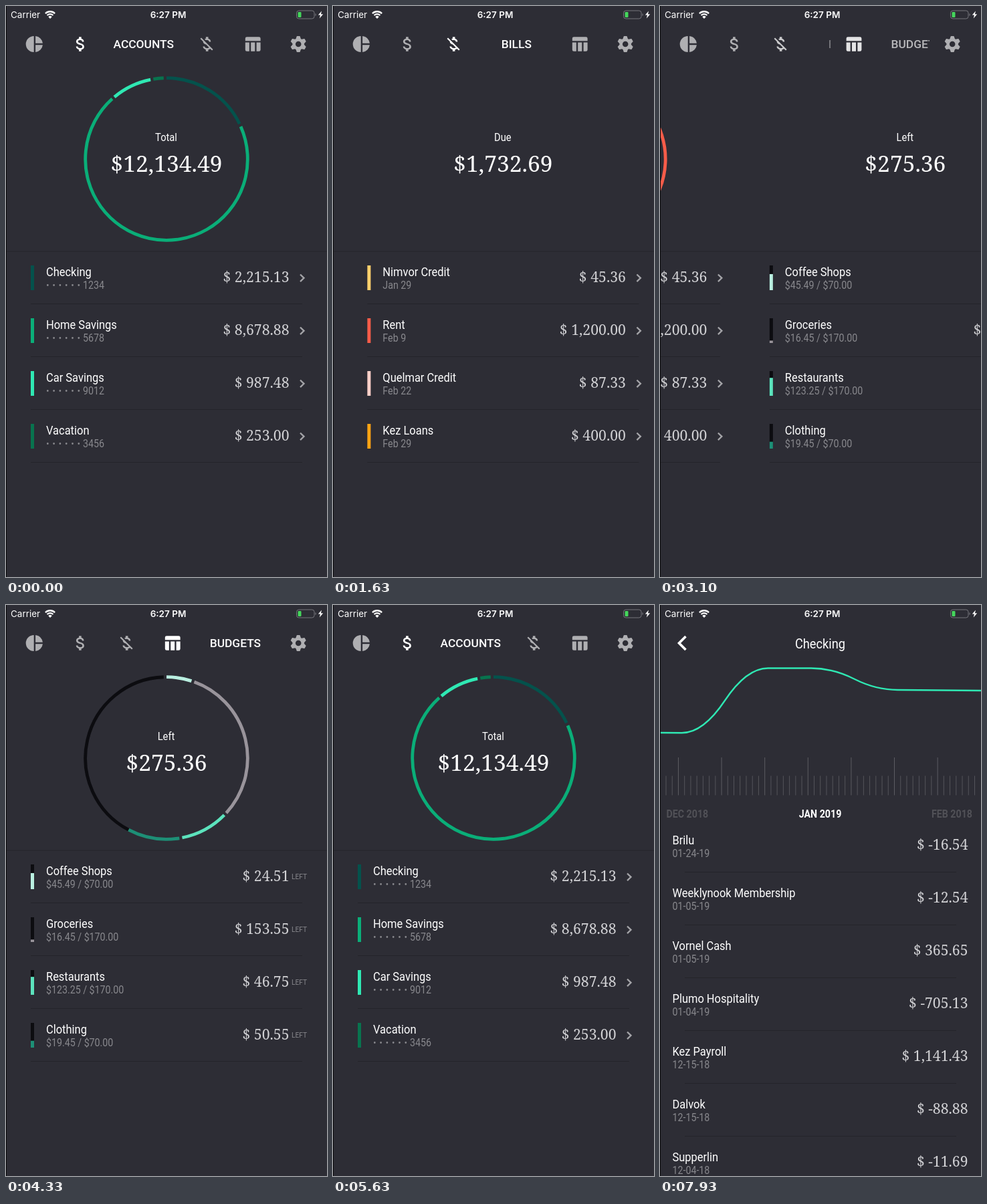
Recreate the animation shown at these times as an HTML page. Size 480x854 px, loop 8 s.

```html
<!DOCTYPE html>
<html lang="en">
<head>
<meta charset="utf-8">
<title>Accounts</title>
<style>
  html, body { margin: 0; width: 100%; height: 100%; overflow: hidden; background: #2d2d35; }
  svg { display: block; width: 100%; height: 100%; }
  text { fill: #fff; white-space: pre; }
  .ui { font-family: Roboto, sans-serif; }
  .num { font-family: "Noto Serif", serif; }
  .sys { font-family: Inter, sans-serif; font-size: 13.5px; }
  .sub { fill: #88888d; }
  .amt { fill: #d2d2d5; }
  .rule { stroke: #24242a; }
</style>
</head>
<body>
<svg id="stage" viewBox="0 0 480 854"></svg>
<script>
const NS = 'http://www.w3.org/2000/svg';
const stage = document.getElementById('stage');
const W = 480, LOOP = 8000, ROW = 79, NARROW = 0.89;
const CELL = 68.57, LABEL = 120;

function el(parent, tag, attrs = {}, text) {
  const node = document.createElementNS(NS, tag);
  for (const k in attrs) node.setAttribute(k, attrs[k]);
  if (text !== undefined) node.textContent = text;
  parent.appendChild(node);
  return node;
}
const group = parent => el(parent, 'g');
const move = (node, x) => node.setAttribute('transform', `translate(${x.toFixed(2)} 0)`);

// Condensed sans text
function label(parent, x, y, size, str, attrs = {}) {
  return el(parent, 'text', { class: 'ui', 'font-size': size,
    transform: `translate(${x} ${y}) scale(${NARROW} 1)`, ...attrs }, str);
}
function money(parent, x, y, str) {
  el(parent, 'text', { class: 'num amt', 'font-size': 21.2, x, y, 'text-anchor': 'end' }, str);
}
function rule(parent, y, x1 = 37, x2 = 443) {
  el(parent, 'line', { class: 'rule', x1, x2, y1: y, y2: y });
}

// ---- easing
const clamp = v => Math.max(0, Math.min(1, v));
const bezier = (x1, y1, x2, y2) => x => {
  x = clamp(x);
  const at = (a, b, u) => 3 * (1 - u) ** 2 * u * a + 3 * (1 - u) * u * u * b + u ** 3;
  let lo = 0, hi = 1;
  for (let i = 0; i < 30; i++) {
    const mid = (lo + hi) / 2;
    if (at(x1, x2, mid) < x) lo = mid; else hi = mid;
  }
  return at(y1, y2, (lo + hi) / 2);
};
const ease = bezier(0.25, 0.1, 0.25, 1);
const easeOut = bezier(0, 0, 0.58, 1);
const decelerate = x => 1 - (1 - clamp(x)) ** 2;

// ---- data
const pages = {
  1: { title: 'Total', total: '$12,134.49', whole: 12134.49, rows: [
    ['Checking', '1234', '2,215.13', '#04524c'],
    ['Home Savings', '5678', '8,678.88', '#0aae78'],
    ['Car Savings', '9012', '987.48', '#2fe8b3'],
    ['Vacation', '3456', '253.00', '#08734e']] },
  2: { title: 'Due', total: '$1,732.69', whole: 1732.69, rows: [
    ['Nimvor Credit', 'Jan 29', '45.36', '#ffd06c'],
    ['Rent', 'Feb 9', '1,200.00', '#f75c49'],
    ['Quelmar Credit', 'Feb 22', '87.33', '#ffd0c9'],
    ['Kez Loans', 'Feb 29', '400.00', '#ffa413']] },
  3: { title: 'Left', total: '$275.36', whole: 480, rows: [
    ['Coffee Shops', '$45.49 / $70.00', '24.51', '#b9efe0', 45.49 / 70],
    ['Groceries', '$16.45 / $170.00', '153.55', '#99949b', 16.45 / 170],
    ['Restaurants', '$123.25 / $170.00', '46.75', '#5ce3bd', 123.25 / 170],
    ['Clothing', '$19.45 / $70.00', '50.55', '#1d8f76', 19.45 / 70]] }
};
const entries = [
  ['Brilu', '01-24-19', '-16.54'],
  ['Weeklynook Membership', '01-05-19', '-12.54'],
  ['Vornel Cash', '01-05-19', '365.65'],
  ['Plumo Hospitality', '01-04-19', '-705.13'],
  ['Kez Payroll', '12-15-18', '1,141.43'],
  ['Dalvok', '12-15-18', '-88.88'],
  ['Supperlin', '12-04-18', '-11.69']
];
const tabNames = ['OVERVIEW', 'ACCOUNTS', 'BILLS', 'BUDGETS', 'SETTINGS'];
const balance = [191, 191.5, 94.5, 94.5, 94.5, 127, 127, 128, 128];

// Tab changes: [start, from, to]
const trips = [[-9999, 0, 1], [1397, 1, 2], [2969, 2, 3], [4830, 3, 1]];
const TAP = 6530, PUSH = 6565;

// ---- home screen
const home = group(stage);
el(home, 'rect', { width: W, height: 854, fill: '#2d2d35' });

const ink = el(home, 'g', { 'clip-path': 'url(#rowClip)' });
const rowClip = el(home, 'clipPath', { id: 'rowClip' });
el(rowClip, 'rect', { y: 367, width: W, height: 78 });
el(ink, 'rect', { y: 367, width: W, height: 78, fill: '#fff', opacity: 0.018 });
const splash = el(ink, 'circle', { cx: 349, cy: 413, fill: '#000', opacity: 0.09 });

rule(home, 367, 0, W);

function point(deg, r = 121.3) {
  const a = deg * Math.PI / 180;
  return `${(240 + r * Math.sin(a)).toFixed(2)} ${(229 - r * Math.cos(a)).toFixed(2)}`;
}
const arc = (a, b) => `M${point(a)}A121.3 121.3 0 ${b - a > 180 ? 1 : 0} 1 ${point(b)}`;

function buildPage(index) {
  const { title, total, whole, rows } = pages[index];
  const g = group(home), ring = [];
  const addArc = (from, to, color) => ring.push({ from, to,
    node: el(g, 'path', { fill: 'none', stroke: color, 'stroke-width': 4.8 }) });

  let angle = 0;
  rows.forEach(([name, info, amount, color, used = 1], i) => {
    const y = 367 + ROW * i;
    const sweep = parseFloat(amount.replace(',', '')) / whole * 352;
    addArc(angle, angle + sweep, color);
    angle += sweep + 2;

    if (used < 1) el(g, 'rect', { x: 37, y: y + 21, width: 5, height: 37, fill: '#0c0c10' });
    el(g, 'rect', { x: 37, y: y + 58 - 37 * used, width: 5, height: 37 * used, fill: color });
    label(g, 60, y + 37, 18.5, name);
    if (index === 1) {
      el(g, 'path', { d: `M62.3 ${y + 50.5}h47`, stroke: '#88888d', 'stroke-width': 2.8,
        'stroke-linecap': 'round', 'stroke-dasharray': '0 9.3' });
    }
    label(g, index === 1 ? 115 : 60, y + 56, 16, info, { class: 'ui sub' });
    money(g, 423.5, y + 46, '$ ' + amount);
    if (index === 3) label(g, 427, y + 43, 11.5, 'LEFT', { class: 'ui sub' });
    else el(g, 'path', { d: `M440 ${y + 34.5}l5.5 5.3l-5.5 5.3`, fill: 'none', stroke: '#a4a4a8', 'stroke-width': 2.3 });
    rule(g, y + 78.5);
  });
  if (index === 3) addArc(angle - 2, 358, '#0c0c10');

  label(g, 239.5, 202, 16.5, title, { 'text-anchor': 'middle' });
  el(g, 'text', { class: 'num', 'font-size': 33.6, 'font-weight': 500, x: 240, y: 248, 'text-anchor': 'middle' }, total);
  return { g, ring };
}
const views = { 1: buildPage(1), 2: buildPage(2), 3: buildPage(3) };

function drawRing(view, p) {
  for (const { from, to, node } of view.ring) {
    node.setAttribute('d', p > 0 ? arc(from * p, to * p) : '');
  }
}

// ---- tab bar
const GLYPH = 'translate(-14.4 -14.4) scale(1.2)';
const glyph = (g, d) => el(g, 'path', { d, transform: GLYPH });
const icons = [
  g => el(g, 'path', { d: 'M-1.2-12A12 12 0 0 0-1.2 12ZM1.2-12A12 12 0 0 1 12-1.2H1.2ZM1.2 1.2H12A12 12 0 0 1 1.2 12Z' }),
  g => glyph(g, 'M11.8 10.9c-2.27-.59-3-1.2-3-2.15 0-1.09 1.01-1.85 2.7-1.85 1.78 0 2.44.85 2.5 2.1h2.21c-.07-1.72-1.12-3.3-3.21-3.81V3h-3v2.16c-1.94.42-3.5 1.68-3.5 3.61 0 2.31 1.91 3.46 4.7 4.13 2.5.6 3 1.48 3 2.41 0 .69-.49 1.79-2.7 1.79-2.06 0-2.87-.92-2.98-2.1h-2.2c.12 2.19 1.76 3.42 3.68 3.83V21h3v-2.15c1.95-.37 3.5-1.5 3.5-3.55 0-2.84-2.43-3.81-4.7-4.4z'),
  g => glyph(g, 'M12.5 6.9c1.78 0 2.44.85 2.5 2.1h2.21c-.07-1.72-1.12-3.3-3.21-3.81V3h-3v2.16c-.53.12-1.03.3-1.48.54l1.47 1.47c.41-.17.91-.27 1.51-.27zM5.33 4.06L4.06 5.33 7.5 8.77c0 2.08 1.56 3.21 3.91 3.91l3.51 3.51c-.34.48-1.05.91-2.42.91-2.06 0-2.87-.92-2.98-2.1h-2.2c.12 2.19 1.76 3.42 3.68 3.83V21h3v-2.15c.96-.18 1.82-.55 2.45-1.12l2.22 2.22 1.27-1.27z'),
  g => glyph(g, 'M10 10h5v11h-5zM17 21h3a2 2 0 0 0 2-2v-9h-5zM20 3H5a2 2 0 0 0-2 2v3h19V5a2 2 0 0 0-2-2zM3 19a2 2 0 0 0 2 2h3V10H3z'),
  g => {
    el(g, 'circle', { r: 6.5, fill: 'none', stroke: '#fff', 'stroke-width': 4.4 });
    for (let k = 0; k < 6; k++) {
      el(g, 'path', { d: 'M-4.2-6.6L-2.5-11.6Q-2.4-12-2-12H2Q2.4-12 2.5-11.6L4.2-6.6Z', transform: `rotate(${k * 60})` });
    }
  }
];
const tabs = tabNames.map((name, i) => {
  const icon = el(home, 'g', { fill: '#fff' });
  icons[i](icon);
  const clip = el(home, 'clipPath', { id: 'tab' + i });
  const rect = el(clip, 'rect', { y: 40, height: 34 });
  const box = el(home, 'g', { 'clip-path': `url(#tab${i})` });
  const text = el(box, 'text', { class: 'ui', 'font-size': 17.4, 'font-weight': 500, y: 62.5, 'text-anchor': 'middle' }, name);
  return { icon, rect, text };
});

function drawTabs(from, to, q) {
  let x = 42.9;
  tabs.forEach(({ icon, rect, text }, i) => {
    const p = i === to ? q : i === from ? 1 - q : 0;
    icon.setAttribute('transform', `translate(${x} 57)`);
    icon.setAttribute('opacity', 0.62 + 0.38 * p);
    rect.setAttribute('x', x + CELL / 2);
    rect.setAttribute('width', LABEL * p);
    text.setAttribute('x', x + CELL / 2 + LABEL / 2);
    text.setAttribute('opacity', p);
    x += CELL + LABEL * p;
  });
}

// ---- detail screen
const detail = group(stage);
const fade = el(detail, 'linearGradient', { id: 'fade' });
el(fade, 'stop', { offset: 0, 'stop-color': '#000', 'stop-opacity': 0 });
el(fade, 'stop', { offset: 1, 'stop-color': '#000', 'stop-opacity': 0.1 });
el(detail, 'rect', { x: -24, width: 24, height: 854, fill: 'url(#fade)' });
el(detail, 'rect', { width: W, height: 854, fill: '#2d2d35' });
el(detail, 'path', { d: 'M38.5 47L28.5 57L38.5 67', fill: 'none', stroke: '#fff', 'stroke-width': 3.6 });
label(detail, 239.5, 64.5, 20.5, 'Checking', { 'text-anchor': 'middle' });

// Weekly balances, smoothed through their midpoints
const WEEK = 64.6;
const curve = balance.slice(1, -1).map((y, i) => {
  const k = i + 1;
  return `Q${WEEK * k} ${y} ${WEEK * (k + 0.5)} ${(y + balance[k + 1]) / 2}`;
});
el(detail, 'path', { fill: 'none', stroke: '#2fe8b3', 'stroke-width': 2.3,
  d: `M0 ${balance[0]}L${WEEK / 2} ${(balance[0] + balance[1]) / 2}` + curve.join('') });

for (let k = 0; k <= 50; k++) {
  const x = 9 + 9.23 * k, tall = k % 7 === 2;
  el(detail, 'line', { x1: x, x2: x, y1: tall ? 228 : 255.5, y2: 284.5, stroke: tall ? '#5c5c62' : '#54545a' });
}
const month = (x, str, anchor, fill) => label(detail, x, 318, 16, str,
  { 'font-weight': 700, 'text-anchor': anchor, style: 'fill:' + fill });
month(9.5, 'DEC 2018', 'start', '#515157');
month(239.5, 'JAN 2019', 'middle', '#fff');
month(467, 'FEB 2018', 'end', '#515157');
entries.forEach(([name, date, amount], i) => {
  const y = ROW * i;
  label(detail, 18.5, y + 357.5, 18.5, name);
  label(detail, 18.5, y + 377, 16, date, { class: 'ui sub' });
  money(detail, 460.5, y + 366, '$ ' + amount);
  rule(detail, y + 399.5);
});

// ---- status bar
el(stage, 'rect', { width: 1, height: 854, fill: '#08080a' });
el(stage, 'text', { class: 'sys', x: 7, y: 18 }, 'Carrier');
el(stage, 'text', { class: 'sys', x: 242.5, y: 18, 'text-anchor': 'middle', 'font-weight': 600 }, '6:27 PM');
el(stage, 'path', { d: 'M58.9 11.2A10 10 0 0 1 73.1 11.2M61.6 14A6.2 6.2 0 0 1 70.4 14', fill: 'none', stroke: '#fff', 'stroke-width': 2.3 });
el(stage, 'path', { d: 'M66 19L63.3 16.2A3.8 3.8 0 0 1 68.7 16.2Z', fill: '#fff' });
el(stage, 'rect', { x: 434.5, y: 7, width: 26.5, height: 12, rx: 3.4, fill: 'none', stroke: '#77777d' });
el(stage, 'rect', { x: 436.5, y: 9, width: 5, height: 8, rx: 1, fill: '#45d65c' });
el(stage, 'path', { d: 'M462.5 11A2.2 2.2 0 0 1 462.5 15Z', fill: '#77777d' });
el(stage, 'path', { d: 'M472 7.5L466.8 13.6H470L468.8 18.5L474.2 12.2H470.9Z', fill: '#fff' });

// ---- timeline
function render(t) {
  const [start, from, to] = trips.filter(trip => trip[0] <= t).pop();
  const age = t - start, dir = Math.sign(to - from), s = ease(age / 300);
  drawTabs(from, to, clamp(age / 200));

  for (const key in views) {
    const i = +key, view = views[i];
    const shown = i === to || (i === from && s < 1);
    view.g.setAttribute('display', shown ? 'inline' : 'none');
    move(view.g, i === to ? dir * W * (1 - s) : -dir * W * s);
    drawRing(view, i === to ? decelerate((age - 240) / 360) : 1);
  }

  const push = easeOut((t - PUSH) / 350);
  move(home, -W / 3 * push);
  move(detail, W * (1 - push));
  detail.setAttribute('display', t >= PUSH ? 'inline' : 'none');
  ink.setAttribute('opacity', clamp((t - TAP) / 60));
  splash.setAttribute('r', 30 + 82 * clamp((t - TAP) / 170));
}

const begin = performance.now();
function tick() {
  render((performance.now() - begin) % LOOP);
  requestAnimationFrame(tick);
}
tick();
</script>
</body>
</html>
```
